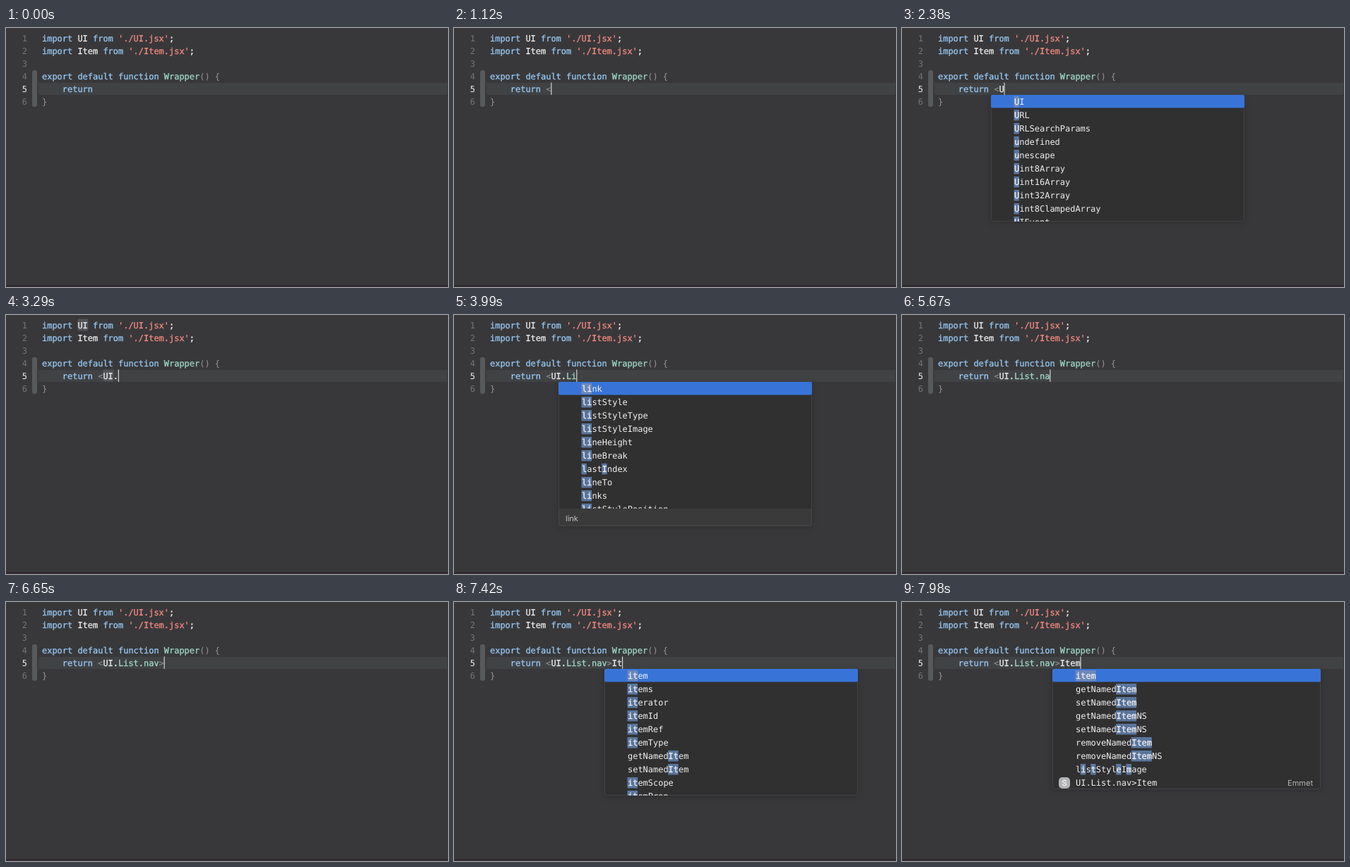
An HTML page that plays this animation: 626 px wide and 368 px high, repeating every 8 s.

```html
<!DOCTYPE html>
<html lang="en">
<head>
<meta charset="utf-8">
<title>Typing JSX</title>
<style>
html, body { margin: 0; width: 100%; height: 100%; overflow: hidden; background: #38383a; }
svg { display: block; }
text { white-space: pre; text-rendering: geometricPrecision; }
.mono { font: 400 12px "DejaVu Sans Mono", "Liberation Mono", monospace; letter-spacing: -0.024px; }
.strong { stroke-width: 0.3px; }
.ui { font: 400 11px Inter, "Liberation Sans", sans-serif; }
#popup { filter: drop-shadow(0 2px 4px rgba(0, 0, 0, .16)); }
</style>
</head>
<body>
<svg id="stage" width="626" height="368" viewBox="0 0 626 368">
  <rect width="626" height="368" fill="#38383a"/>
  <rect x="46" y="78" width="579" height="17" fill="#404244"/>
  <rect y="365" width="626" height="3" fill="#302a30"/>
  <rect x="37" y="60" width="7" height="52" rx="3" fill="#58595b"/>
  <g id="marks" fill="#525356"></g>
  <g id="code"></g>
  <g id="typed"></g>
  <rect id="caret" y="77.5" width="1.2" height="17.5" fill="#d2d2d2"/>
  <g id="popup"></g>
</svg>
<script>
const LOOP = 8000, STEP = 70, CELL = 7.2, LEFT = 51, ROW = 19, TOP = 95;
const INK = { key: '#98c8f4', str: '#f48a81', name: '#ededed', type: '#9fd8c6', dim: '#959597' };
const SOURCE = '<UI.List.nav>Item';
const START = 11;

// Time of each key press, one per character of SOURCE
const KEYS = [980, 2100, 2520, 3150, 3570, 3780, 4060, 4340, 4690,
  5180, 5600, 6020, 6650, 6930, 7210, 7490, 7770];

// Caret fades: start time, opacity reached
const FADES = [[70, 1], [420, 0], [1610, 0], [1960, 1]];
const FADE = 210;

const U = 'UI URL URLSearchParams undefined unescape Uint8Array Uint16Array Uint32Array Uint8ClampedArray UIEvent';
const UI = 'UI UIEvent Uint8Array Uint16Array Uint32Array Uint8ClampedArray build quit require continue';
const L = 'length lastIndexOf localeCompare link lastIndex localStorage location localName label lang';
const LI = 'link listStyle listStyleType listStyleImage lineHeight lineBreak lastIndex lineTo links listStylePosition';
const LIS = 'listStyle listStyleType listStyleImage listStylePosition classList addListener lists playlist removeListener lastIndexOf';
const N = 'name normalize now nodeName nodeType nodeValue nextSibling namespaceURI naturalWidth navigator';
const NA = 'name navigator namespaceURI naturalWidth naturalHeight namedItem nodeName getNamedItem setNamedItem tagName';
const NAV = 'navigator canvas navigate navigation onnavigate unavailable nativeValue navigationStart namespaceURI nodeValue';
const I = 'item indexOf includes isArray isInteger innerHTML innerText insertBefore isNaN id';
const IT = 'item items iterator itemId itemRef itemType getNamedItem setNamedItem itemScope itemProp';
const ITE = 'item iterator getNamedItem setNamedItem getNamedItemNS setNamedItemNS removeNamedItem removeNamedItemNS listStyleImage';
const ITEM = 'item getNamedItem setNamedItem getNamedItemNS setNamedItemNS removeNamedItem removeNamedItemNS listStyleImage';

// from, to, token column, width, query, items, Emmet row, detail line
const POPUPS = [
  [2170, 2590, 12, 359, 'u', U],
  [2590, 3150, 12, 359, 'ui', UI, '', 'UI'],
  [3640, 3850, 15, 359, 'l', L, '', 'length'],
  [3850, 4130, 15, 359, 'li', LI, '', 'link'],
  [4130, 4410, 15, 359, 'lis', LIS, '', 'listStyle'],
  [4410, 4690, 12, 380, '', '', 'UI.List', '<UI.List></UI.List>'],
  [5250, 5600, 20, 365, 'n', N, '', 'name'],
  [5740, 6090, 20, 365, 'na', NA, '', 'name'],
  [6090, 6650, 20, 365, 'nav', NAV, '', 'navigator'],
  [7000, 7280, 24, 359, 'i', I],
  [7280, 7560, 24, 359, 'it', IT],
  [7560, 7840, 24, 359, 'ite', ITE],
  [7840, 8000, 24, 380, 'item', ITEM, 'UI.List.nav>Item']
];

const el = id => document.getElementById(id);
const esc = s => s.replace(/&/g, '&amp;').replace(/</g, '&lt;').replace(/>/g, '&gt;');
const colX = col => LEFT + col * CELL;
const lineY = n => 18.5 + (n - 1) * 18;
const rect = (x, y, w, h, fill, more = '') =>
  `<rect x="${x}" y="${y}" width="${w}" height="${h}" fill="${fill}" ${more}/>`;
const text = (x, y, s, fill, cls = 'mono', more = '') => {
  const stroke = cls.includes('strong') ? `stroke="${fill}"` : '';
  return `<text x="${x}" y="${y}" fill="${fill}" ${stroke} class="${cls}" ${more}>${esc(s)}</text>`;
};

// Lays out [ink, string] pairs along a line of code
function tokens(line, col, list) {
  return list.map(([ink, s]) => {
    const out = text(colX(col), lineY(line), s, INK[ink], ink === 'dim' ? 'mono' : 'mono strong');
    col += s.length;
    return out;
  }).join('');
}

function staticCode() {
  let out = '';
  for (let n = 1; n <= 6; n++) {
    out += text(30, lineY(n), String(n), n === 5 ? '#f0f0f0' : '#747476', 'mono', 'text-anchor="end"');
  }
  ['UI', 'Item'].forEach((name, i) => {
    out += tokens(i + 1, 0, [['key', 'import '], ['name', name], ['key', ' from '],
      ['str', `'./${name}.jsx'`], ['name', ';']]);
  });
  out += tokens(4, 0, [['key', 'export default function '], ['type', 'Wrapper'], ['dim', '() {']]);
  out += tokens(5, 4, [['key', 'return']]);
  return out + tokens(6, 0, [['dim', '}']]);
}

function typedCode(count) {
  const parts = [['dim', 0, 1], ['name', 1, 4], ['type', 4, 12], ['dim', 12, 13], ['name', 13, 17]];
  return tokens(5, START, parts.map(([ink, a, b]) => [ink, SOURCE.slice(a, Math.min(b, count))])
    .filter(p => p[1]));
}

// Whole match if there is one, otherwise the letters in order
function matches(word, query) {
  const low = word.toLowerCase(), at = low.indexOf(query);
  if (at >= 0) return [...query].map((_, i) => at + i);
  let pos = -1;
  const found = [...query].map(c => (pos = low.indexOf(c, pos + 1)));
  return found.includes(-1) ? [] : found;
}

function itemRow(word, query, x, y) {
  const hits = matches(word, query);
  let out = '';
  hits.forEach(i => {
    out += rect(x + i * CELL - 0.5, y - 8, CELL + 0.2, 15.5, y < TOP + ROW ? '#6d88bb' : '#5a769e');
  });
  [...word].forEach((c, i) => {
    out += text(x + i * CELL, y + 4, c, '#f0f0f0', hits.includes(i) ? 'mono strong' : 'mono');
  });
  return out;
}

function emmetRow(word, left, width, y, first) {
  const cx = left + 17;
  return rect(cx - 8, y - 8, 16, 16, '#b2b3b5', 'rx="5"') +
    text(cx, y + 4, 'S', '#f4f4f4', 'ui strong', 'text-anchor="middle"') +
    text(left + 33, y + 4, word, '#f0f0f0', first ? 'mono strong' : 'mono') +
    text(left + width - 11, y + 4, 'Emmet', first ? '#d5e2f8' : '#b4b4b4', 'ui', 'text-anchor="end"');
}

function popup([, , col, width, query, items, emmet, detail]) {
  const left = Math.round(colX(col)) - 11;
  const words = items ? items.split(' ') : [];
  const listH = Math.min(180, (words.length + (emmet ? 1 : 0)) * ROW);
  const height = listH + (detail ? 26 : 0) - (listH === 180 && detail ? 1 : 0);
  const midY = i => TOP + 10 + i * ROW;
  let rows = words.map((w, i) => itemRow(w, query, left + 33, midY(i))).join('');
  if (emmet) rows += emmetRow(emmet, left, width, midY(words.length), !words.length);
  let out = rect(left, TOP, width, height, '#303031', 'rx="3"');
  if (detail) out += rect(left, TOP + listH, width, height - listH, '#3a3a3b', 'rx="3"');
  out += rect(left + 0.5, TOP + 0.5, width - 1, height - 1, 'none', 'rx="3" stroke="#555" stroke-opacity=".5"');
  out += rect(left, TOP, width, ROW - 0.5, '#3874d8', 'rx="2"');
  out += `<svg x="0" y="0" width="626" height="${TOP + listH}" overflow="hidden">${rows}</svg>`;
  if (detail) out += text(left + 10, TOP + listH + 18, detail, '#c6c6c6', 'ui');
  return out;
}

function caretAlpha(t) {
  if (t >= KEYS[1]) return 1;
  let alpha = t >= KEYS[0] ? 1 : 0;
  for (const [at, goal] of FADES) {
    if (t < at || (t >= KEYS[0] && at < KEYS[0])) continue;
    const k = Math.min(1, (t - at + STEP) / (FADE + STEP));
    alpha = goal ? k : 1 - k;
  }
  return alpha;
}

function markAlpha(t) {
  if (t < 2800 || t >= 3430) return 0;
  return t >= 3360 ? 0.5 : 1;
}

function draw(t) {
  const count = KEYS.filter(k => k <= t).length;
  const open = POPUPS.find(p => t >= p[0] && t < p[1]);
  el('typed').innerHTML = typedCode(count);
  el('caret').setAttribute('x', colX(START + count) - 0.2);
  el('caret').setAttribute('opacity', caretAlpha(t));
  el('marks').setAttribute('opacity', markAlpha(t));
  el('popup').innerHTML = open ? popup(open) : '';
}

el('code').innerHTML = staticCode();
el('marks').innerHTML = [[7, 1], [12, 5]].map(([col, n]) =>
  `<rect x="${colX(col)}" y="${lineY(n) - 13}" width="15" height="17" rx="2"/>`).join('');

let shown = -1;
const begin = performance.now();
function tick() {
  const t = Math.floor(((performance.now() - begin) % LOOP) / STEP) * STEP;
  if (t !== shown) draw(shown = t);
  requestAnimationFrame(tick);
}
tick();
</script>
</body>
</html>
```
